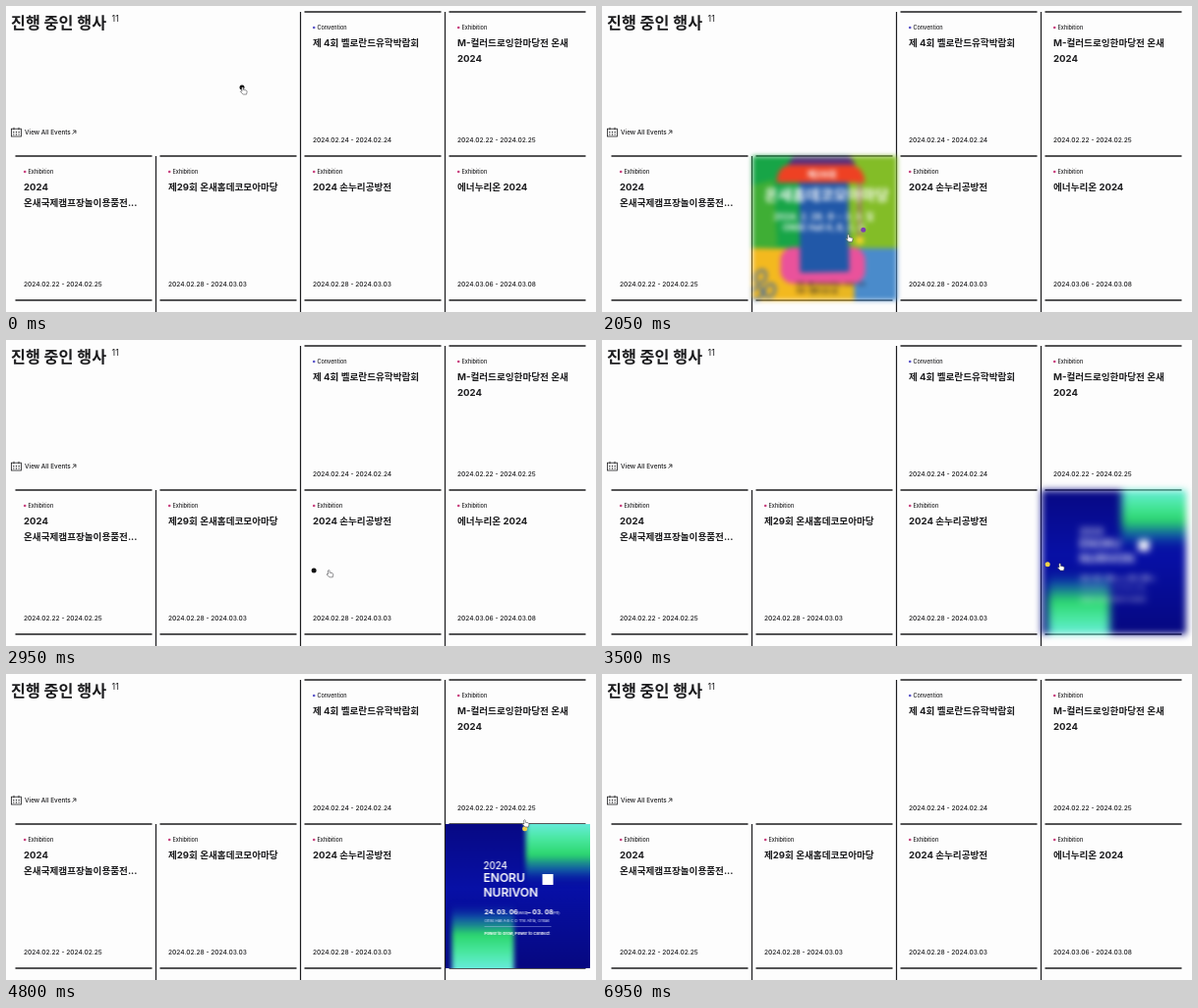
An HTML page with a canvas for the animation above (7 s loop, 600 px wide and 312 px high).

```html
<!DOCTYPE html>
<html lang="ko">
<head>
<meta charset="utf-8">
<title>진행 중인 행사</title>
<style>
html, body { margin: 0; width: 100%; height: 100%; overflow: hidden; background: #fdfdfd; }
canvas { display: block; width: 600px; height: 312px; }
</style>
</head>
<body>
<canvas id="stage"></canvas>
<script>
const W = 600, H = 312, LOOP = 7000, CELL = 147;
const INK = '#1c1c1e';
const FONT = 'Inter, "Noto Sans CJK KR", sans-serif';
const KFONT = '"Noto Sans CJK KR", sans-serif';
const dpr = window.devicePixelRatio || 1;

function setup(canvas, w, h) {
  canvas.width = Math.round(w * dpr);
  canvas.height = Math.round(h * dpr);
  const c = canvas.getContext('2d');
  c.scale(dpr, dpr);
  return c;
}

function text(c, str, x, y, size, weight = 400, color = INK, align = 'left', family = FONT) {
  c.font = `${weight} ${size}px ${family}`;
  c.fillStyle = color;
  c.textAlign = align;
  c.fillText(str, x, y);
}

function box(c, x, y, w, h, color, r = 0) {
  c.fillStyle = color;
  c.beginPath();
  c.roundRect(x, y, w, h, r);
  c.fill();
}

function disc(c, x, y, r, color) {
  c.fillStyle = color;
  c.beginPath();
  c.arc(x, y, r, 0, 7);
  c.fill();
}

function poly(c, pts, color) {
  c.fillStyle = color;
  c.beginPath();
  for (let i = 0; i < pts.length; i += 2) c.lineTo(pts[i], pts[i + 1]);
  c.closePath();
  c.fill();
}

function line(c, x1, y1, x2, y2, width, color = INK) {
  c.strokeStyle = color;
  c.lineWidth = width;
  c.beginPath();
  c.moveTo(x1, y1);
  c.lineTo(x2, y2);
  c.stroke();
}

function poster(paint) {
  const canvas = document.createElement('canvas');
  const c = setup(canvas, CELL, CELL);
  paint(c);
  return canvas;
}

function paintStudy(c) {
  box(c, 0, 0, CELL, CELL, '#25a524');
  box(c, 60.5, 5, 28, 21, '#d9e6cf', 1.5);
  box(c, 62, 6.5, 8.5, 18, '#129a52');
  box(c, 70.5, 6.5, 8.5, 18, '#ffffff');
  box(c, 79, 6.5, 8, 18, '#f5843c');
  box(c, 37.5, 30, 81, 11.5, '#ffffff', 4);
  text(c, '주한 벨로란드대사관 후원', 78, 38.4, 6.6, 700, '#25942a', 'center', KFONT);
  text(c, '벨로란드', 74, 74, 28, 900, '#fff', 'center', KFONT);
  text(c, '유학박람회', 74, 106, 28, 900, '#fff', 'center', KFONT);
  text(c, '13개 벨로란드대학교와 11개 벨로란드어학원이 한자리에', 74, 124, 5.5, 700, '#fff', 'center', KFONT);
  text(c, '2.24 (토) 온새관 4층', 20, 133.7, 4.7, 500, '#d5f0d2', 'left', KFONT);
  text(c, '벨로란드한마음길유학 주최', 71, 133.7, 4.8, 500, '#d5f0d2', 'left', KFONT);
}

function paintLiving(c) {
  box(c, 0, 0, CELL, CELL, '#17a547');
  box(c, 98, 0, 49, 95, '#83bd27');
  poly(c, [0, 30, 22, 24, 26, 92, 0, 95], '#3fae35');
  box(c, 0, 94, 60, 53, '#f3b91f');
  box(c, 58, 94, 55, 53, '#e9b722');
  box(c, 104, 94, 43, 53, '#4a8bcb');
  poly(c, [36, 9, 42, 1, 100, 1, 106, 9], '#5b2f7d');
  c.fillStyle = '#ee4123';
  c.beginPath();
  c.moveTo(25, 27);
  c.quadraticCurveTo(26, 9, 40, 9);
  c.lineTo(100, 9);
  c.quadraticCurveTo(113, 10, 115, 27);
  c.fill();
  box(c, 29, 93, 86, 37, '#ea529b', 13);
  poly(c, [48, 27, 98, 27, 99, 118, 49, 119], '#2158a8');
  line(c, 109.5, 27, 109.5, 83, 2, '#b6438f');
  disc(c, 109.5, 86, 4.3, '#f6d629');
  c.strokeStyle = '#2b62b5';
  c.lineWidth = 2.2;
  for (const [x, y] of [[9, 123], [18, 137], [5, 140]]) {
    c.beginPath();
    c.ellipse(x, y, 5, 7, 0.4, 0, 7);
    c.stroke();
  }
  text(c, '제29회', 71, 21.8, 9.6, 700, '#fff', 'center');
  text(c, '온새홈데코모아마당', 76, 44.5, 15.3, 700, '#fff', 'center', KFONT);
  text(c, '2024. 2. 28. 수 ~ 3. 3. 일', 73, 64.5, 8.9, 600, '#fff', 'center');
  text(c, 'ONSE Hall A, B, C, D', 73, 76, 8.6, 600, '#fff', 'center');
  text(c, '주최', 45, 132.2, 5, 600, '#281d2c');
  disc(c, 59.5, 130.3, 2, '#281d2c');
  text(c, 'formnesting · onse · nrv', 63, 132, 4.5, 700, '#281d2c');
  text(c, '주관  기쁨이 솟는 뜰', 45, 139.2, 5, 600, '#281d2c');
}

function glow(c, x, y, w, h, flip) {
  const g = flip ? c.createLinearGradient(0, y + h, 0, y) : c.createLinearGradient(0, y, 0, y + h);
  g.addColorStop(0, '#70ecec');
  g.addColorStop(0.28, '#4be8a4');
  g.addColorStop(0.55, '#2bd66c');
  g.addColorStop(0.78, 'rgba(20,110,170,.75)');
  g.addColorStop(1, 'rgba(8,20,170,0)');
  c.fillStyle = g;
  c.fillRect(x, y, w, h);
}

function paintEnergy(c) {
  const g = c.createLinearGradient(0, 0, 0, CELL);
  g.addColorStop(0, '#070984');
  g.addColorStop(0.45, '#0710a6');
  g.addColorStop(1, '#060880');
  c.fillStyle = g;
  c.fillRect(0, 0, CELL, CELL);
  c.filter = `blur(${2.5 * dpr}px)`;
  glow(c, 82, -5, 72, 67, false);
  glow(c, 7, 80, 63, 72, true);
  c.filter = 'none';
  text(c, '2024', 39, 46, 9.7, 500, '#fff');
  text(c, 'ENORU', 39, 59, 12, 600, '#fff');
  text(c, 'NURIVON', 39, 74, 12, 600, '#fff');
  box(c, 99, 51, 11, 11, '#fff');
  text(c, '24. 03. 06', 40, 92.3, 6.8, 700, '#fff');
  text(c, '(Wed)', 73, 92.3, 4, 400, '#fff');
  text(c, '– 03. 08', 84, 92.3, 6.6, 700, '#fff');
  text(c, '(Fri)', 109, 92.3, 4, 400, '#fff');
  text(c, 'Onse Hall A·B·C·D The Atria, Onsae', 40, 99.6, 4, 400, '#dfe6ff');
  line(c, 40, 104.5, 108, 104.5, 0.4, '#c6d0ff');
  text(c, 'Power to Grow, Power to Connect', 40, 112.7, 4.1, 700, '#fff');
}

function paintDrawing(c) {
  box(c, 0, 0, CELL, CELL, '#8960ae');
  let seed = 9;
  const rnd = () => (seed = (seed * 16807) % 2147483647) / 2147483647;
  c.strokeStyle = 'rgba(190,155,215,.4)';
  c.lineWidth = 0.6;
  for (let i = 0; i < 16; i++) {
    c.beginPath();
    c.ellipse(rnd() * 140 + 3, rnd() * 75 + 66, 2 + rnd() * 4, 2 + rnd() * 3, rnd() * 3, 0, 7);
    c.stroke();
  }
  box(c, 10, 12, 28, 47, 'rgba(70,40,100,.45)', 1);
  box(c, 8, 10, 28, 47, '#dddce0', 1);
  box(c, 16, 18, 13, 30, '#f5f4f6', 2);
  box(c, 19, 22, 7, 9, '#cbc9d0', 1);
  disc(c, 22.5, 39, 2, '#d4b83c');
  disc(c, 22, 14, 0.9, '#8c8a90');
  disc(c, 22, 53, 0.9, '#8c8a90');
  box(c, 44, 15, 64, 23, 'rgba(70,40,100,.4)');
  box(c, 42, 13, 64, 22, '#dcdbdc');
  const sign = [['MHD', 45, '#4c4a50'], ['LIT', 62, '#eec228'], ['AND', 73, '#4c4a50'], ['DIM', 90, '#4c4a50']];
  for (const [word, x, color] of sign) text(c, word, x, 26.6, 7, 500, color);
  for (const [ch, x, y, size] of [['M', 37, 77, 37], ['.', 64, 90, 34], ['h', 71, 87, 33], ['D', 87, 82, 34]]) {
    c.save();
    c.translate(x, y);
    c.transform(0.8, 0.2, 0, 1, 0, 0);
    for (let k = 7; k > 0; k--) text(c, ch, k * 0.7, k * 0.5, size, 900, k > 5 ? '#2f2b35' : '#4a4550');
    text(c, ch, 0, 0, size, 900, '#e7c72b');
    text(c, ch, 1, 0.8, size, 900, '#454049');
    c.restore();
  }
  poly(c, [128, 99, 147, 84, 147, 126, 141, 119], '#f4f1f3');
  c.fillStyle = '#f2cdb1';
  c.beginPath();
  c.moveTo(104, 84);
  c.quadraticCurveTo(111, 80, 119, 83);
  c.quadraticCurveTo(121, 73, 131, 71);
  c.quadraticCurveTo(141, 70, 147, 79);
  c.lineTo(147, 107);
  c.quadraticCurveTo(137, 113, 126, 106);
  c.quadraticCurveTo(116, 103, 116, 93);
  c.quadraticCurveTo(109, 89, 104, 84);
  c.fill();
  line(c, 117, 92, 130, 89, 0.7, '#d9a98b');
  line(c, 119, 83, 128, 82, 0.7, '#d9a98b');
  text(c, 'M-컬러드로잉한마당전', 74, 101.5, 7.5, 800, '#fff', 'center');
  text(c, '2024. 2. 22(목) ~ 25(일)', 74, 116, 6.5, 400, '#fff', 'center');
  text(c, '온새 모임관 D홀', 74, 125, 5.4, 400, '#fff', 'center');
}

const cards = [
  { x: 299, y: 6, kind: 'Convention', dot: '#5a55c8', lines: ['제 4회 벨로란드유학박람회'], date: '2024.02.24 - 2024.02.24',
    art: poster(paintStudy), from: 350, to: 1550, ball: '#9152b8' },
  { x: 446, y: 6, lines: ['M-컬러드로잉한마당전 온새', '2024'], date: '2024.02.22 - 2024.02.25',
    art: poster(paintDrawing), from: 4850, to: 5640, ball: '#e9cf5a' },
  { x: 5, y: 153, lines: ['2024', '온새국제캠프장놀이용품전...'], date: '2024.02.22 - 2024.02.25' },
  { x: 152, y: 153, lines: ['제29회 온새홈데코모아마당'], date: '2024.02.28 - 2024.03.03',
    art: poster(paintLiving), from: 1870, to: 2740, ball: '#7d3fae' },
  { x: 299, y: 153, lines: ['2024 손누리공방전'], date: '2024.02.28 - 2024.03.03' },
  { x: 446, y: 153, lines: ['에너누리온 2024'], date: '2024.03.06 - 2024.03.08',
    art: poster(paintEnergy), from: 3400, to: 4835, ball: '#f0d04a' }
];

// time, x, y of the pointer tip
const path = [
  [0, 240, 83], [350, 300, 86], [700, 392, 88], [1100, 408, 84], [1400, 395, 122],
  [1600, 372, 160], [1870, 297, 215], [2150, 238, 238], [2500, 287, 234], [2700, 295, 233],
  [2900, 316, 235], [3300, 425, 231], [3500, 465, 228], [3800, 520, 228], [4200, 540, 215],
  [4550, 532, 180], [4800, 527, 149], [5000, 531, 115], [5250, 552, 75], [5550, 591, 44], [5680, 612, 36]
];

function pointer(t) {
  const last = path.length - 1;
  if (t <= 0) return path[0].slice(1);
  if (t >= path[last][0]) return path[last].slice(1);
  let i = 0;
  while (path[i + 1][0] <= t) i++;
  const a = path[i], b = path[i + 1], p = path[Math.max(0, i - 1)], n = path[Math.min(last, i + 2)];
  const d = b[0] - a[0], u = (t - a[0]) / d, u2 = u * u, u3 = u2 * u;
  return [1, 2].map(k => {
    const m0 = (b[k] - p[k]) / (b[0] - p[0]) * d;
    const m1 = (n[k] - a[k]) / (n[0] - a[0]) * d;
    return (2 * u3 - 3 * u2 + 1) * a[k] + (u3 - 2 * u2 + u) * m0 + (3 * u2 - 2 * u3) * b[k] + (u3 - u2) * m1;
  });
}

const ctx = setup(document.getElementById('stage'), W, H);

function drawPage(c) {
  box(c, 0, 0, W, H, '#fdfdfd');
  text(c, '진행 중인 행사', 5, 22.6, 16.2, 700);
  text(c, '11', 107.5, 16.3, 9);
  c.strokeStyle = INK;
  c.lineWidth = 0.8;
  c.strokeRect(5.5, 125.2, 10, 7.8);
  line(c, 8, 123.8, 8, 126.4, 0.8);
  line(c, 13, 123.8, 13, 126.4, 0.8);
  for (let i = 0; i < 6; i++) box(c, 7.2 + (i % 3) * 2.7, 128 + (i > 2 ? 2.4 : 0), 1.2, 1.2, INK);
  text(c, 'View All Events', 19, 131.2, 6.4, 500);
  line(c, 67.5, 130.6, 70.8, 127.3, 0.8);
  line(c, 68, 127, 71.2, 127, 0.8);
  line(c, 70.9, 127, 70.9, 130, 0.8);

  for (const k of cards) {
    line(c, k.x + 4.5, k.y, k.x + 143.5, k.y, 1.4);
    if (k.y > 100) line(c, k.x + 4.5, 300, k.x + 143.5, 300, 1.4);
    disc(c, k.x + 14.2, k.y + 16, 1.3, k.dot || '#c8407e');
    text(c, k.kind || 'Exhibition', k.x + 17.5, k.y + 18, 5.5, 500);
    k.lines.forEach((s, i) => text(c, s, k.x + 13, k.y + 35 + i * 16, 9.6, 700));
    text(c, k.date, k.x + 13, k.y + 133.4, 6.6, 500);
  }
  line(c, 152.5, 153, 152.5, H, 1.2);
  line(c, 299.5, 6, 299.5, H, 1.2);
  line(c, 446.5, 6, 446.5, H, 1.2);
}

function drawHand(c, x, y) {
  c.save();
  c.translate(x - 1, y - 0.5);
  c.beginPath();
  c.moveTo(0.6, 0.8);
  c.quadraticCurveTo(1.4, -0.4, 2.2, 0.8);
  c.lineTo(2.4, 3);
  c.quadraticCurveTo(6, 3, 6, 4.6);
  c.lineTo(5.4, 7.6);
  c.lineTo(2, 7.6);
  c.lineTo(-0.8, 4.8);
  c.quadraticCurveTo(-0.6, 3.6, 0.8, 4.6);
  c.closePath();
  c.fillStyle = '#fff';
  c.fill();
  c.strokeStyle = '#4a4a4e';
  c.lineWidth = 0.6;
  c.stroke();
  c.restore();
}

function drawArt(c, card, t) {
  const age = t - card.from;
  const soft = 5 * Math.max(0, 1 - age / 350);
  c.save();
  c.globalAlpha = Math.min(1, age / 70);
  if (soft > 0.05) c.filter = `blur(${soft * dpr}px)`;
  c.drawImage(card.art, card.x + 0.5, card.y, CELL, CELL);
  c.restore();
}

function frame(now) {
  const t = now % LOOP;
  drawPage(ctx);
  const active = cards.find(k => k.art && t >= k.from && t < k.to);
  if (active) drawArt(ctx, active, t);
  const [bx, by] = pointer(t - 65);
  disc(ctx, bx, by, 2.5, active ? active.ball : '#111');
  const [px, py] = pointer(t);
  drawHand(ctx, px, py);
  requestAnimationFrame(frame);
}
requestAnimationFrame(frame);
</script>
</body>
</html>
```
